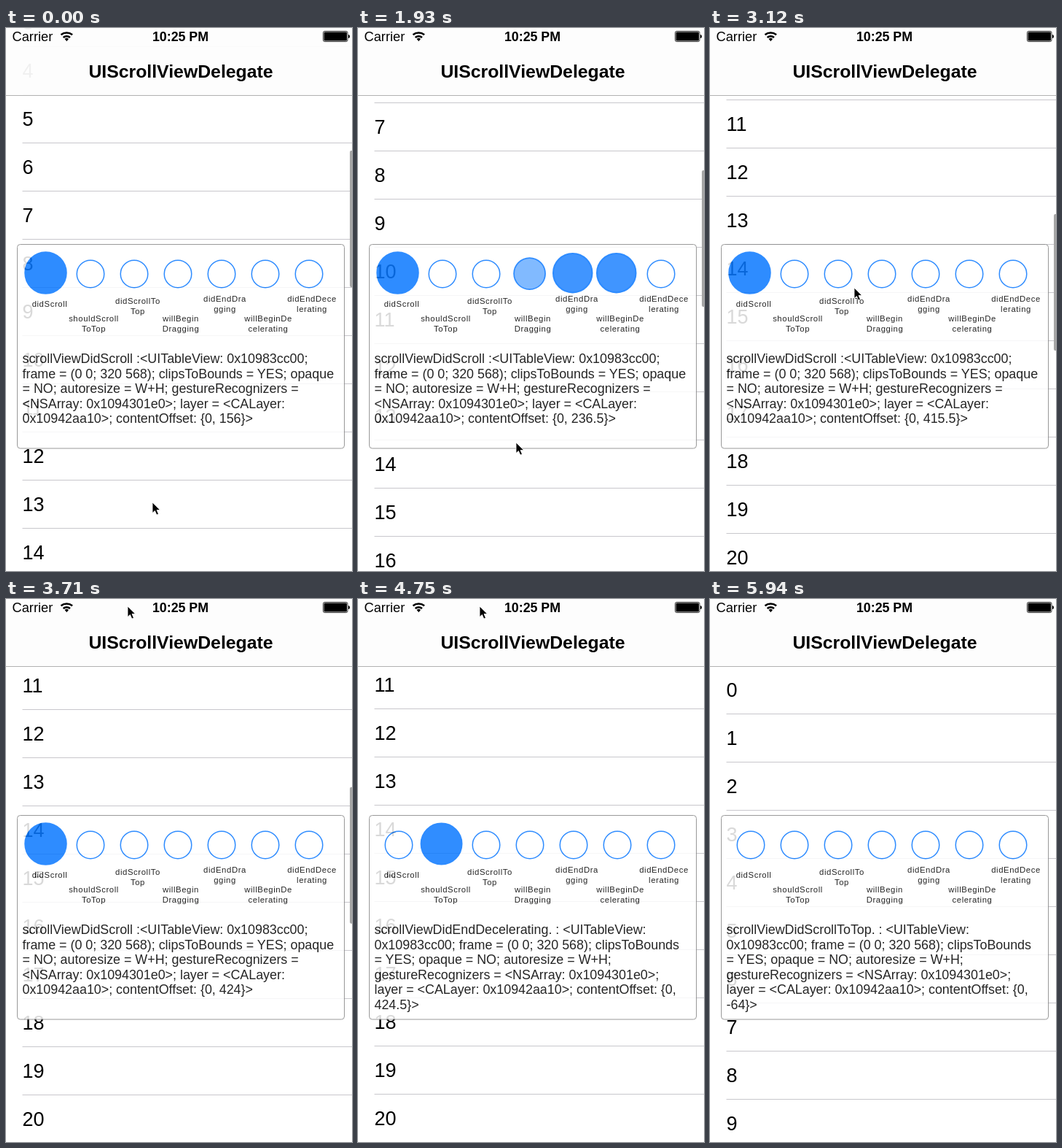
These frames come from a looping animation (475 by 744 pixels, 6.92 s). An HTML page:

```html
<!DOCTYPE html>
<html lang="en">
<head>
<meta charset="utf-8">
<title>UIScrollViewDelegate</title>
<style>
  html, body { margin: 0; width: 100%; height: 100%; overflow: hidden; background: #fff; }
  svg { display: block; font-family: "Liberation Sans", Arial, sans-serif; white-space: pre; }
  #rows { font-size: 27px; }
  #rows rect { fill: #c8c7cc; }
  #labels { font-size: 11.3px; letter-spacing: .6px; text-anchor: middle; }
  #log { font-size: 17.87px; }
  #dots circle { fill: #0a78ff; stroke: #0a78ff; }
</style>
</head>
<body>
<svg width="475" height="744" viewBox="0 0 475 744">
  <g id="rows"></g>
  <rect id="bar" x="472" width="6" height="187" rx="2" fill="#a6a6a6"/>

  <rect id="nav" width="475" height="92" fill="#fdfdfd"/>
  <rect y="92" width="475" height="1" fill="#b2b2b2"/>
  <text x="8.5" y="18" font-size="18.3">Carrier</text>
  <g fill="none" stroke="#000" stroke-width="2.6">
    <path d="M75.5 9.3a12.4 12.4 0 0 1 15.6 0M78.6 13a7.6 7.6 0 0 1 9.4 0"/>
    <path d="M83.3 18.2l-2.7-3.1a4 4 0 0 1 5.4 0z" fill="#000" stroke="none"/>
  </g>
  <text x="239.5" y="18" font-size="17.8" font-weight="bold" text-anchor="middle">10:25 PM</text>
  <rect x="435.4" y="4.4" width="33.6" height="14.2" rx="2.2" fill="none" stroke="#000" stroke-width=".8"/>
  <rect x="436.5" y="5.5" width="31.4" height="12" rx="1.2"/>
  <path d="M470 9q2 0 2 2.5t-2 2.5z"/>
  <text x="240" y="68" font-size="24.8" font-weight="bold" text-anchor="middle">UIScrollViewDelegate</text>

  <g opacity=".85">
    <rect x="15.5" y="296.5" width="449" height="279.5" rx="4" fill="#fff" stroke="#888"/>
    <g id="labels"></g>
    <g id="log"></g>
    <g id="dots"></g>
  </g>
  <path id="mouse" d="M0 0v14.5l3.4-3 2.4 5.6 2.6-1.1-2.4-5.5h4.6z" stroke="#fff" stroke-width=".8"/>
</svg>
<script>
const $ = id => document.getElementById(id);
const set = (el, attrs) => { for (const k in attrs) el.setAttribute(k, attrs[k]); };
const clamp = v => Math.max(0, Math.min(1, v));
const text = (x, y, s) => `<text x="${x}" y="${y}">${s.replace(/</g, '&lt;')}</text>`;

const LOOP = 6920, STEP = 148.4, FADE = 800, SHRINK = 450;

// Callback times per circle; the first one follows the scrolling spans instead
const fired = [[], [4735], [5100], [1610], [1860], [1860], [110, 3850]];
const spans = [[-1000, 100], [1610, 3845], [4760, 5100]];
const path = [[300, 201, 650], [880, 205, 684], [1610, 205, 684],
              [1929, 217, 568], [2820, 217, 568], [3600, 167, 10]];

const labels = [
  [60, 381.5, 'didScroll'],
  [120.5, 402, 'shouldScroll', 'ToTop'],
  [181, 378, 'didScrollTo', 'Top'],
  [240, 402, 'willBegin', 'Dragging'],
  [300.5, 375, 'didEndDra', 'gging'],
  [360, 402, 'willBeginDe', 'celerating'],
  [420, 375, 'didEndDece', 'lerating']
];

$('rows').innerHTML = Array.from({ length: 24 }, (_, i) =>
  text(22.5, 134 + 66 * i, '' + i) +
  `<rect x="22.5" y="${157 + 66 * i}" width="453" height="1"/>`).join('');
$('labels').innerHTML = labels.map(([x, y, ...lines]) =>
  lines.map((s, i) => text(x, y + 14 * i, s)).join('')).join('');
$('dots').innerHTML = '<circle/>'.repeat(7);

function offsetAt(t) {
  if (t < 110) return 156;
  if (t < 1610) return 157;
  if (t < 1929) return 157 + 79.5 * (t - 1610) / 319;
  if (t < 3850) return 424.5 - 188 * (1 - (t - 1929) / 2500) ** 4.705;
  const p = clamp((t - 4760) / 340);
  return 424.5 - 488.5 * p * p * (3 - 2 * p);
}

function mouseAt(t) {
  const i = path.findIndex(p => p[0] > t);
  if (i < 1) return path.at(i).slice(1);
  const [a, b] = [path[i - 1], path[i]], p = (t - a[0]) / (b[0] - a[0]);
  return [1, 2].map(k => Math.round(a[k] + (b[k] - a[k]) * p));
}

function logLines(t, scrolling, off) {
  if (scrolling) return [
    'scrollViewDidScroll :<UITableView: 0x10983cc00;',
    'frame = (0 0; 320 568); clipsToBounds = YES; opaque',
    '= NO; autoresize = W+H; gestureRecognizers =',
    '<NSArray: 0x1094301e0>; layer = <CALayer:',
    `0x10942aa10>; contentOffset: {0, ${off}}>`];
  return [
    `scrollViewDid${t < 5000 ? 'EndDecelerating' : 'ScrollToTop'}. : <UITableView:`,
    '0x10983cc00; frame = (0 0; 320 568); clipsToBounds',
    '= YES; opaque = NO; autoresize = W+H;',
    'gestureRecognizers = <NSArray: 0x1094301e0>;',
    'layer = <CALayer: 0x10942aa10>; contentOffset: {0,',
    `${off}}>`];
}

function draw(t) {
  const off = Math.round(offsetAt(t) * 2) / 2;
  const span = spans.filter(s => s[0] <= t).pop();
  const lastScroll = Math.min(t, span[1]);

  set($('rows'), { transform: `translate(0 ${Math.round(-(off + 64) * 1.5)})` });
  set($('bar'), { y: 168 + (off - 156) * .335, opacity: clamp(1 - (t - lastScroll - 100) / 300) });
  set($('nav'), { 'fill-opacity': t < 100 ? .95 : 1 });

  [...$('dots').children].forEach((dot, i) => {
    const last = i ? fired[i].filter(f => f <= t).pop() ?? -LOOP : lastScroll;
    const age = t - last, scale = 1 + .5 * clamp(1 - age / SHRINK);
    set(dot, {
      cx: 56 + 60 * i - 3 * (scale - 1), cy: 337 - 3 * (scale - 1), r: 18.75 * scale,
      'stroke-width': 1.5 * scale, 'fill-opacity': clamp(1 - age / FADE)
    });
  });

  $('log').innerHTML = logLines(t, t <= span[1], off)
    .map((s, i) => text(22.5, 459 + 20.6 * i, s)).join('');
  set($('mouse'), { transform: `translate(${mouseAt(t)})`, opacity: t < 5400 ? 1 : 0 });
}

let shown = -1;
const start = performance.now();
function tick() {
  const t = (performance.now() - start) % LOOP;
  const step = Math.min(40, Math.floor((t + 12) / STEP));
  if (step !== shown) draw((shown = step) * STEP);
  requestAnimationFrame(tick);
}
tick();
</script>
</body>
</html>
```
